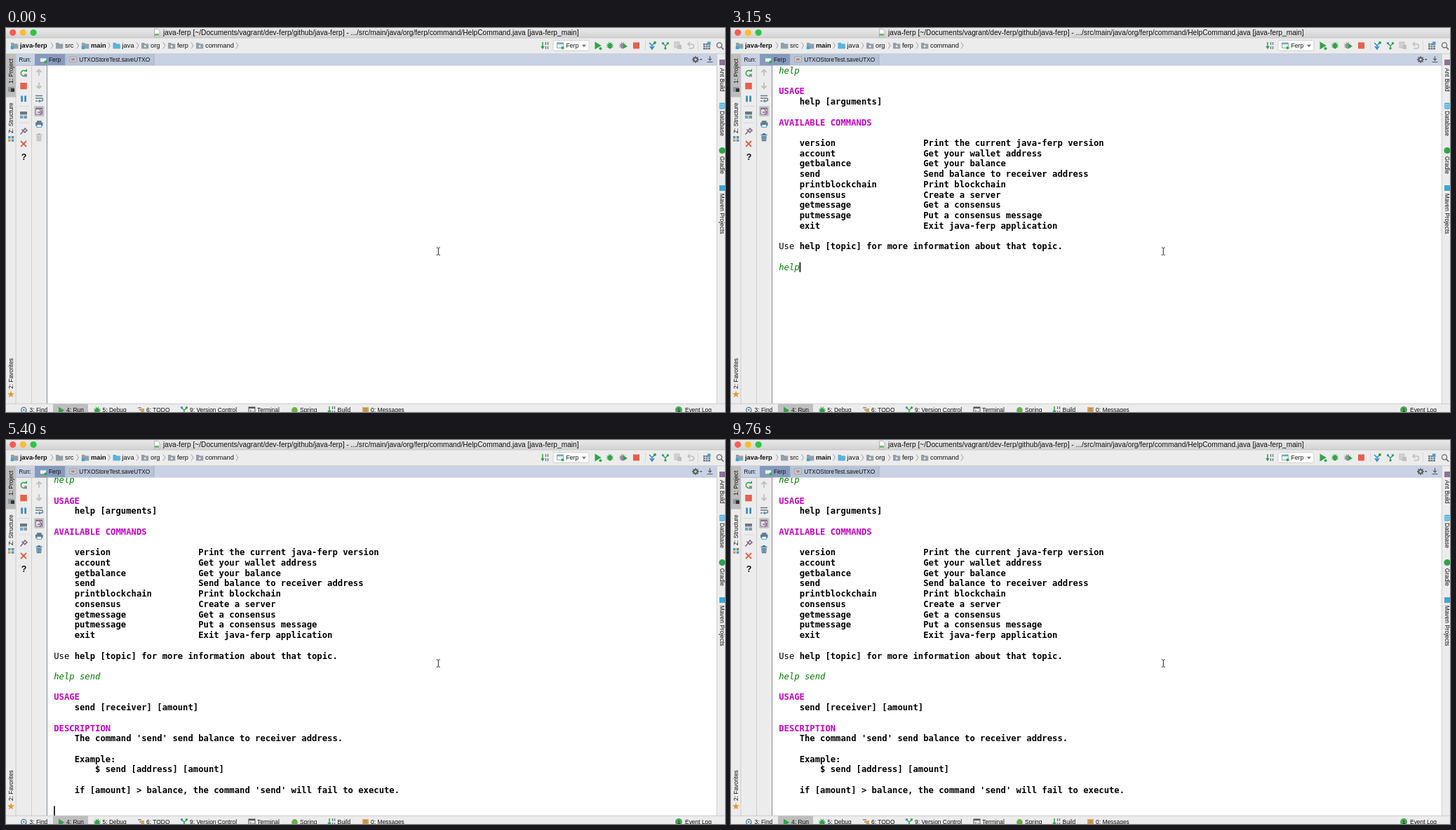
These frames come from a looping animation (1025 by 547 pixels, 9900 ms). An HTML page:

```html
<!DOCTYPE html>
<html lang="en">
<head>
<meta charset="utf-8">
<title>Console help</title>
<style>
html, body { margin: 0; width: 100%; height: 100%; overflow: hidden; background: #fff; }
svg { display: block; width: 1025px; height: 547px; }
text { font-family: "Liberation Sans", Arial, sans-serif; white-space: pre; fill: #111; }
.mono text { font-family: "DejaVu Sans Mono", monospace; font-size: 12.22px; fill: #000; }
.mono .cmd { font-style: italic; fill: #007f00; }
.mono .head { font-weight: bold; fill: #c800c8; }
.mono .bold { font-weight: bold; }
</style>
</head>
<body>
<svg id="stage" viewBox="0 0 1025 547" xmlns="http://www.w3.org/2000/svg">
  <defs>
    <linearGradient id="bar" x2="0" y2="1"><stop stop-color="#e9e9e9"/><stop offset="1" stop-color="#d2d2d2"/></linearGradient>
    <clipPath id="view"><rect x="59" y="53.5" width="954" height="481.5"/></clipPath>
  </defs>
  <g id="chrome"></g>
  <g clip-path="url(#view)">
    <g id="console" class="mono"></g>
    <rect id="caret" x="68.3" width="1.6" height="14"/>
  </g>
  <rect id="scroll" x="1006.7" y="58" width="4.8" height="475.5" rx="2.4" fill="#7f7f7f"/>
  <g id="trash"></g>
  <path d="M613.8 313h1.6l.9 .8 .9-.8h1.6M613.8 323.3h1.6l.9-.8 .9 .8h1.6M616.3 313.8v8.7" fill="none" stroke="#222" stroke-width="1"/>
</svg>
<script>
const NS = "http://www.w3.org/2000/svg";
const $ = id => document.getElementById(id);
const chrome = $("chrome");

function add(parent, tag, attrs, content) {
  const el = document.createElementNS(NS, tag);
  for (const k in attrs) el.setAttribute(k, attrs[k]);
  if (content !== undefined) el.textContent = content;
  parent.appendChild(el);
  return el;
}
const rect = (x, y, width, height, fill, more) => add(chrome, "rect", { x, y, width, height, fill, ...more });
const dot = (cx, cy, r, fill) => add(chrome, "circle", { cx, cy, r, fill });
const fillPath = (d, fill) => add(chrome, "path", { d, fill });
const line = (d, stroke, width = 1) => add(chrome, "path", { d, stroke, "stroke-width": width, fill: "none" });
const label = (x, y, s, size = 8.4, more) => add(chrome, "text", { x, y, "font-size": size, ...more }, s);
const turned = (x, y, s, angle) => label(0, 0, s, 8.4, { transform: `translate(${x} ${y}) rotate(${angle})` });

const GREY = "#7a858e", BLUE = "#3b8fc4", GREEN = "#33a349", RED = "#e5604d", PALE = "#bfbfbf";

function folder(x, color, badge) {
  fillPath(`M${x} 21h4l1 1.5h5.3v7h-10.3z`, color);
  if (badge === "pkg") dot(x + 5.2, 26, 1.5, "#eee");
  if (badge === "mod") rect(x - .3, 26, 4.5, 4.2, "#37a6d6");
}
function windowIcon(x, y, live) {
  rect(x, y, 9, 7.5, "#edf2f5", { stroke: "#8797a3", "stroke-width": .8 });
  rect(x, y, 9, 2.2, "#68a8cc");
  if (live) dot(x + 8, y + 7.3, 2.1, "#28b33f");
}
function bug(x, y, color) {
  line(`M${x - 4.5} ${y - 2.5}l9 5M${x - 4.5} ${y + 2.5}l9-5M${x - 5} ${y}h10M${x - 2} ${y - 5}l2 3 2-3`, color, 1);
  add(chrome, "ellipse", { cx: x, cy: y + .5, rx: 3.1, ry: 4, fill: color });
}
function play(x, y, size) {
  fillPath(`M${x} ${y - size}l${size * 1.7} ${size}l${-size * 1.7} ${size}z`, GREEN);
}
function bits(x, y) {
  line(`M${x + 2} ${y - 5}v8M${x} ${y + 1}l2 3 2-3`, GREEN, 1.5);
  line(`M${x + 6.5} ${y - 5}v4M${x + 6.5} ${y + 1}v4M${x + 9.5} ${y - 5}v4M${x + 9.5} ${y + 1}v4`, "#68747d", 1.3);
}
function branch(x, y, color) {
  line(`M${x - 3.5} ${y - 3}l3.5 3.5v4M${x + 3.5} ${y - 3}l-3.5 3.5`, color, 1.3);
  dot(x - 3.5, y - 3.2, 1.7, BLUE);
  dot(x + 3.5, y - 3.2, 1.7, color);
  dot(x, y + 4, 1.7, color);
}

function drawTop() {
  rect(0, 0, 1025, 547, "#ececec");
  rect(0, 0, 1025, 14, "url(#bar)");
  rect(0, 13.6, 1025, .8, "#bdbdbd");
  ["#fc5b57", "#fdbc2e", "#2fc544"].forEach((c, i) => dot(9.7 + i * 14.7, 6.6, 4.6, c));
  fillPath("M211.5 1.5h5l2.5 2.5v9h-7.5z", "#fbfbfb");
  line("M211.5 1.5h5l2.5 2.5v9h-7.5z", "#999", .7);
  rect(212, 8, 6, 3.5, "#76b87c");
  label(224, 10.4, "java-ferp [~/Documents/vagrant/dev-ferp/github/java-ferp] - .../src/main/java/org/ferp/command/HelpCommand.java [java-ferp_main]", 10.2, { fill: "#444" });

  const slate = "#92a0ab", bold = { "font-weight": "bold" };
  [[7, "java-ferp", 64, slate, "mod", bold], [71, "src", 100.5, slate], [108, "main", 145.5, slate, "mod", bold],
   [152.5, "java", 186, "#58b2df"], [193, "org", 224, slate, "pkg"], [231, "ferp", 264, slate, "pkg"],
   [271, "command", 328, slate, "pkg"]].forEach(([x, s, end, color, badge, more]) => {
    folder(x, color, badge);
    label(x + 13, 28.2, s, 9.3, more);
    line(`M${end} 20.5l3 4.5-3 4.5`, "#8a8a8a", .8);
  });

  bits(763, 25);
  rect(780, 17.5, 51, 14.8, "#fff", { rx: 2.5, stroke: "#c6c6c6", "stroke-width": .8 });
  windowIcon(785.5, 21, true);
  label(798.5, 28.2, "Ferp", 8.6);
  fillPath("M821 23.7h6l-3 3.8z", "#777");
  play(839.5, 25, 5.4);
  dot(847.5, 29.3, 2, "#28b33f");
  bug(861, 25, GREEN);
  bug(879, 25, "#8b9298");
  play(880, 26, 3.6);
  rect(894, 20.5, 9, 9, RED);
  line("M926 20l-5 5M917 21l4 4v5M918 26l3 4 3-4", BLUE, 1.7);
  dot(925, 21, 2, GREEN);
  branch(940, 25, GREEN);
  rect(953, 20, 7, 8, "#d2d2d2", { stroke: PALE });
  rect(957, 24, 6, 6, PALE);
  line("M975 20l-3 3 3 3M972 23h5.5a3 3 0 0 1 0 6h-4", PALE, 1.5);
  line("M911.5 18v14M986.5 18v14", "#d4d4d4", .8);
  rect(994, 22, 10, 8.5, "#657886");
  line("M994 24.8h10M994 27.6h10M997.3 22v8M1000.7 22v8", "#edf3f6", .8);
  rect(1000, 19.5, 4.5, 4.5, "#4a9dcb");
  add(chrome, "circle", { cx: 1017, cy: 24.5, r: 3.6, fill: "none", stroke: "#666", "stroke-width": 1.3 });
  line("M1019.6 27.2l3.5 3.5", "#666", 1.6);
  rect(0, 36.4, 1025, .8, "#c3c3c3");
}

function drawHeader() {
  rect(14, 37, 999, 16.5, "#c8d2e4");
  rect(41, 37, 43, 16.5, "#8699bd");
  rect(84, 37, 127, 16.5, "#b7c3d7");
  line("M84 37v16M211 37v16", "#98a5b9", .7);
  line("M14 53.3h999", "#a7b1c1", .7);
  label(18.5, 48, "Run:", 8.2);
  windowIcon(48.5, 41, true);
  label(61, 48, "Ferp", 8.3, { fill: "#fff" });
  rect(91, 41, 9, 7.5, "#d6d6d6", { stroke: "#999", "stroke-width": .8 });
  rect(93, 43, 5, 3.5, "#b48a8a");
  label(104.3, 48, "UTXOStoreTest.saveUTXO", 8.3);
  add(chrome, "circle", { cx: 983, cy: 45, r: 2.7, fill: "none", stroke: "#555", "stroke-width": 1.8 });
  for (let i = 0; i < 8; i++)
    add(chrome, "path", { d: "M983 40v2", stroke: "#555", "stroke-width": 1.3, transform: `rotate(${i * 45} 983 45)` });
  fillPath("M989 44h3.5l-1.8 2.3z", "#555");
  line("M1003.5 40v6M1001 43.5l2.5 2.7 2.5-2.7M999.5 48.5h8", "#555", 1.1);
}

function drawTools() {
  rect(59, 53.5, 954, 481.5, "#fff");
  rect(0, 37, 14, 61.5, "#bdbdbd");
  line("M14 37v498M36.5 53.5v481.5M1013.3 37v498", "#c6c6c6", .8);
  line("M58.5 53.5v481.5", "#818b98", 1);

  line("M28 61.5a4 4 0 1 0 1 4.5", GREEN, 1.5);
  fillPath("M26 62h4v-4z", GREEN);
  rect(26, 65.5, 4, 4, "#8c8c8c");
  rect(20.3, 78, 9.5, 9.3, RED);
  rect(21.2, 96.5, 2.8, 8.6, BLUE);
  rect(26.2, 96.5, 2.8, 8.6, BLUE);
  line("M18 111.5h15M18 135h15", "#d0d0d0", .8);
  rect(20, 119, 10, 4.4, "#687984");
  rect(20, 124.7, 4.5, 4.3, "#67a9cc");
  rect(25.5, 124.7, 4.5, 4.3, "#87939b");
  line("M20.5 151.5l4-4.5M22.5 144.5l5 5M24.5 146.5l2.5-3.5 3 3-3.3 2.5", "#83698f", 1.6);
  line("M21 161l8 8M29 161l-8 8", RED, 1.8);
  label(21.7, 187.5, "?", 12.5, { "font-weight": "bold", fill: BLUE });

  line("M47 68v-8M43.5 63l3.5-3.5 3.5 3.5M47 77.5v8M43.5 82.5l3.5 3.5 3.5-3.5", PALE, 1.8);
  line("M42 96.5h10M42 100h8.5a2 2 0 0 1 0 4h-3M42 104h3", "#687984", 1.3);
  fillPath("M48.5 101.6v4.8l-3-2.4z", BLUE);
  rect(40, 111, 14.5, 15, "#c5c5c5", { rx: 2 });
  rect(42.5, 114, 9, 9, "#e7e7e7", { stroke: "#807788", "stroke-width": .9 });
  rect(42.5, 114, 9, 2, "#807788");
  line("M45 120h4M48 116.5l3 3.5-3 3.5", "#9a58a3", 1.4);
  rect(44, 132, 6.5, 3, "#6d7d88");
  rect(42, 134.5, 10.5, 5, "#687984");
  rect(44, 137.5, 6.5, 4, "#eaf5fa", { stroke: BLUE, "stroke-width": .8 });

  turned(9.8, 79, "1: Project", -90);
  rect(3, 84, 8.5, 7, "#8c969e");
  rect(7, 86, 5, 5, "#333");
  turned(9.8, 150, "Z: Structure", -90);
  ["#4a9dcb", GREY, "#d69a51", "#4a9dcb"]
    .forEach((c, i) => rect(3 + i % 2 * 4.8, 154 + (i >> 1) * 4.5, 3.6, 3.4, c));
  turned(9.8, 514, "2: Favorites", -90);
  fillPath(Array.from({ length: 10 }, (_, i) => {
    const r = i % 2 ? 2.2 : 5.3, a = Math.PI * (i / 5 - .5);
    return (i ? "L" : "M") + (7 + r * Math.cos(a)).toFixed(2) + " " + (522 + r * Math.sin(a)).toFixed(2);
  }).join("") + "z", "#e8982d");

  rect(1017, 45, 8, 8, "#8c7194");
  turned(1018, 57, "Ant Build", 90);
  rect(1016.8, 106.5, 8.2, 9, "#55b3df", { rx: 2 });
  line("M1016.5 109.5h8.5M1016.5 112.5h8.5", "#d9eef7", .7);
  turned(1018, 118, "Database", 90);
  dot(1021, 174.5, 4.6, "#2fa34d");
  turned(1018, 182.7, "Gradle", 90);
  rect(1017, 224, 8, 8, "#3fa7d6");
  turned(1018, 235.7, "Maven Projects", 90);
}

function drawBottom() {
  rect(0, 535, 1025, 12, "#ececec");
  rect(0, 534.8, 1025, .8, "#c3c3c3");
  rect(67, 535.5, 50, 12, "#bebebe");
  [[33.5, "3: Find"], [86, "4: Run"], [137.5, "5: Debug"], [200, "6: TODO"], [262, "9: Version Control"],
   [358, "Terminal"], [419, "Spring"], [472.5, "Build"], [520, "0: Messages"], [968, "Event Log"]]
    .forEach(([x, s]) => label(x, 547.2, s, 8.45));
  add(chrome, "circle", { cx: 25.3, cy: 544, r: 3.7, fill: "#dceaf2", stroke: "#60717e", "stroke-width": 1.2 });
  dot(25.3, 544, 1.3, BLUE);
  line("M28 546.5l3 3", "#60717e", 1.5);
  play(75, 544.7, 5);
  bug(130, 544.7, GREEN);
  line("M188 541h5M190 544h5M192 547h3", GREY, 1.3);
  rect(193, 542, 4, 5, "#e0a14a");
  branch(254, 544, GREEN);
  rect(346, 540, 9, 8, "#e8e8e8", { stroke: "#555", "stroke-width": 1 });
  rect(346, 540, 9, 2, "#555");
  line("M348 544l1.7 1.5-1.7 1.5M351 547h3", "#444", .9);
  dot(411.5, 544.5, 4.4, "#68b145");
  bits(459, 544);
  rect(508, 540, 9, 8, "#d8a75f");
  line("M510 542.5h5M510 545h5", "#96703a", .9);
  dot(959, 544, 5, "#4aa657");
  label(957, 546.8, "1", 7.5, { fill: "#fff" });
}

function drawTrash() {
  const g = $("trash");
  add(g, "path", { d: "M42.5 151.5h9v1.6h-9zM45 150h4v1.5h-4zM43.3 153.8h7.4l-.6 7.5h-6.2z" });
  add(g, "path", { d: "M45.6 155v5M48.4 155v5", stroke: "#ececec", "stroke-width": .6 });
}

const STEP = 14.72, ADVANCE = 12.22 * .602, LEFT = 68.2;

function print(parent, row, col, s, cls) {
  return add(parent, "text", { x: LEFT + col * ADVANCE, y: 65 + row * STEP, class: cls }, s);
}

const view = $("console");
const first = print(view, 0, 0, "", "cmd");
const usage = add(view, "g", {});
const second = print(view, 19, 0, "", "cmd");
const detail = add(view, "g", {});

function fillConsole() {
  print(usage, 2, 0, "USAGE", "head");
  print(usage, 3, 4, "help [arguments]", "bold");
  print(usage, 5, 0, "AVAILABLE COMMANDS", "head");
  [["version", "Print the current java-ferp version"], ["account", "Get your wallet address"],
   ["getbalance", "Get your balance"], ["send", "Send balance to receiver address"],
   ["printblockchain", "Print blockchain"], ["consensus", "Create a server"],
   ["getmessage", "Get a consensus"], ["putmessage", "Put a consensus message"],
   ["exit", "Exit java-ferp application"]].forEach(([name, about], i) => {
    print(usage, 7 + i, 4, name, "bold");
    print(usage, 7 + i, 28, about, "bold");
  });
  print(usage, 17, 0, "Use", "");
  print(usage, 17, 4, "help [topic] for more information about that topic.", "bold");

  print(detail, 21, 0, "USAGE", "head");
  print(detail, 22, 4, "send [receiver] [amount]", "bold");
  print(detail, 24, 0, "DESCRIPTION", "head");
  print(detail, 25, 4, "The command 'send' send balance to receiver address.", "bold");
  print(detail, 27, 4, "Example:", "bold");
  print(detail, 28, 8, "$ send [address] [amount]", "bold");
  print(detail, 30, 4, "if [amount] > balance, the command 'send' will fail to execute.", "bold");
}

const LOOP = 9900;
const keys1 = [930, 1080, 1220, 1820];
const keys2 = [2700, 2850, 3000, 3150, 3440, 3440, 3590, 3730, 3880];
const blinks = [300, 4780, 5250, 5840, 6320, 6770, 7370, 7820, 8270, 8870, 9310, 9760];
const passed = (times, t) => times.filter(k => t >= k).length;
const show = (el, on) => el.setAttribute("visibility", on ? "visible" : "hidden");

function render(t) {
  const n1 = passed(keys1, t), n2 = passed(keys2, t);
  first.textContent = "help".slice(0, n1);
  second.textContent = "help send".slice(0, n2);
  show(usage, t >= 2260);
  show(detail, t >= 4330);

  const shift = t >= 4330 ? -3.7 : 0;
  view.setAttribute("transform", `translate(0 ${shift})`);

  let row = 0, col = n1;
  if (t >= 4330) { row = 32; col = 0; }
  else if (t >= 4180) { row = 20; col = 0; }
  else if (t >= 2260) { row = 19; col = n2; }
  else if (t >= 1960) { row = 1; col = 0; }
  const caret = $("caret");
  caret.setAttribute("x", LEFT + col * ADVANCE);
  caret.setAttribute("y", 54 + row * STEP + shift);
  show(caret, passed(blinks, t) % 2 === 1);

  show($("scroll"), t >= 4330 && t < 5400);
  $("scroll").setAttribute("opacity", t < 5250 ? 1 : .5);
  $("trash").setAttribute("fill", t >= 2400 ? "#4f7f9c" : PALE);
}

drawTop();
drawHeader();
drawTools();
drawBottom();
drawTrash();
fillConsole();

const start = performance.now();
function tick() {
  render((performance.now() - start) % LOOP);
  requestAnimationFrame(tick);
}
render(0);
requestAnimationFrame(tick);
</script>
</body>
</html>
```
